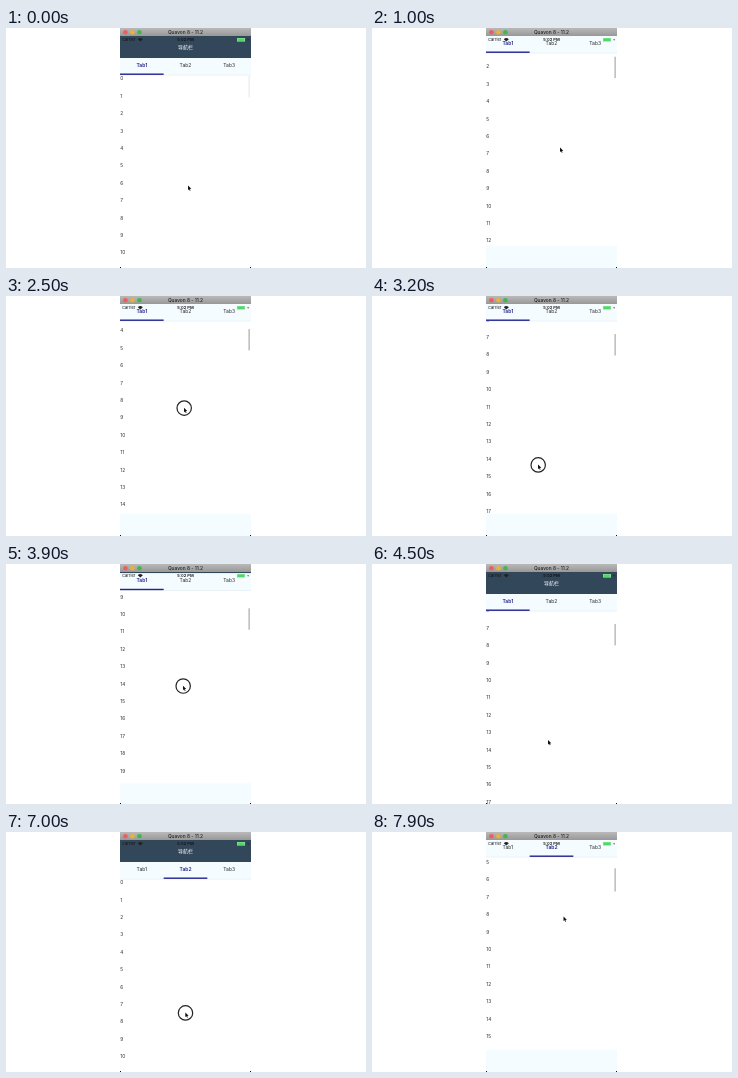
An HTML page with a canvas for the animation above (8000 ms loop, 360x240 px).

```html
<!DOCTYPE html>
<html lang="zh">
<head>
<meta charset="utf-8">
<style>
  html, body { margin: 0; width: 100%; height: 100%; overflow: hidden; background: #fff; }
  canvas { display: block; }
</style>
</head>
<body>
<canvas id="stage" width="360" height="240"></canvas>
<script>
const c = document.getElementById('stage').getContext('2d');
const LOOP = 8000, LEFT = 114, WIDTH = 131, TOP = 8, NAV = 22, TABS = 17, ROW = 17.4;
const LIST_H = 240 - TOP - NAV - TABS;
const AZURE = '#f5fcff', NAVY = '#23238f', INK = '#2a2a2a';
const SLOP = 100, FLING = 650, TRAVEL = 500;

// Each drag moves the cursor and flings the list of one page to a new scroll offset.
const drags = [
  { press: 150, release: 700, from: [182, 157.5], to: [188, 119.5], page: 0, scroll: 26, header: NAV },
  { press: 1100, release: 1700, from: [188, 119.5], to: [177.5, 172.5], page: 0, scroll: 1.3, header: 0 },
  { press: 1950, release: 2550, from: [177.5, 172.5], to: [178, 110], page: 0, scroll: 109, header: NAV },
  { press: 3100, release: 3550, from: [166, 168.5], to: [177, 120], page: 0, scroll: 158, header: NAV },
  { press: 3750, release: 4350, from: [177, 120], to: [176, 176], page: 0, scroll: 94, header: 0 },
  { press: 5750, release: 6150, from: [205, 175], to: [165, 176], header: 0 },
  { press: 6900, release: 7500, from: [179.3, 180.5], to: [191.5, 84.5], page: 1, scroll: 90.4, header: NAV }
];
drags.forEach((d, i) => {
  const next = drags[i + 1];
  d.start = d.press + SLOP;
  d.rest = Math.min(d.release + FLING, next ? next.press + SLOP : Infinity);
});
const pageRows = [100, 92];

const progress = (t, a, b) => Math.min(1, Math.max(0, (t - a) / (b - a)));
const smooth = u => u * u * (3 - 2 * u);
const easeOut = u => Math.sin(u * Math.PI / 2);
const mix = (a, b, u) => a + (b - a) * u;

const scrollAt = (page, t) => drags.filter(d => d.page === page)
  .reduce((s, d) => mix(s, d.scroll, easeOut(progress(t, d.start, d.rest))), 0);

const collapseAt = t => drags
  .reduce((h, d) => mix(h, d.header, smooth(progress(t, d.start, d.start + 350))), 0);

const swipeAt = t => WIDTH * smooth(progress(t, 5850, 6600));

// Scroll bars show while a list moves and fade soon after it rests.
const barAlpha = (page, t) => Math.max(page ? 0 : .25 * (1 - progress(t, 0, 150)),
  ...drags.filter(d => d.page === page)
    .map(d => progress(t, d.start, d.start + 150) * (1 - progress(t, d.rest + 300, d.rest + 600))));

const cursorAt = t => [0, 1].map(axis => drags.reduce((v, d, i) => {
  const free = i ? Math.max(drags[i - 1].release, d.press - TRAVEL) : -TRAVEL;
  const begin = mix(v, d.from[axis], i ? smooth(progress(t, free, d.press)) : 1);
  return mix(begin, d.to[axis], smooth(progress(t, d.start, d.release)));
}, 0));

function rect(color, x, y, w, h) {
  c.fillStyle = color;
  c.fillRect(x, y, w, h);
}

function dot(color, x, y, r) {
  c.fillStyle = color;
  c.beginPath();
  c.arc(x, y, r, 0, 7);
  c.fill();
}

function text(str, x, y, color = INK, size = 5, weight = 400, align = 'center') {
  c.font = `${weight} ${size}px Inter, "Noto Sans CJK SC", "Noto Sans CJK", sans-serif`;
  c.textAlign = align;
  c.fillStyle = color;
  c.fillText(str, x, y);
}

function clipped(x, y, w, h, draw) {
  c.save();
  c.beginPath();
  c.rect(x, y, w, h);
  c.clip();
  draw();
  c.restore();
}

function drawPage(page, x, top, t) {
  const scroll = scrollAt(page, t), ratio = LIST_H / (pageRows[page] * ROW);
  rect('#fff', x, top, WIDTH, LIST_H);
  for (let n = Math.max(0, Math.floor(scroll / ROW) - 1); n * ROW < scroll + LIST_H + ROW; n++)
    text(n, x + .3, top + 5.3 + n * ROW - scroll, INK, 4.8, 400, 'left');
  c.globalAlpha = barAlpha(page, t);
  rect('#999', x + 128.6, top + 1 + scroll * ratio, 1, LIST_H * ratio);
  c.globalAlpha = 1;
}

function drawHeader(shift, swipe, t) {
  const y = TOP - shift, tabs = y + NAV, active = t < 6400 ? 0 : 1;
  rect('#33475b', LEFT, y, WIDTH, NAV);
  text('导航栏', 179.5, y + 13.4, '#fff', 5);
  rect(AZURE, LEFT, tabs, WIDTH, TABS);
  rect('#d9e6ea', LEFT, tabs + TABS - .2, WIDTH, .5);
  for (let i = 0; i < 3; i++)
    text('Tab' + (i + 1), LEFT + WIDTH * (i + .5) / 3, tabs + 8.8,
      i === active ? NAVY : INK, 5, i === active ? 600 : 400);
  rect(NAVY, LEFT + swipe / 3, tabs + 15.5, WIDTH / 3, 1.4);
}

function drawStatus() {
  text('Carrier', 116, 13.4, '#111', 4.1, 400, 'left');
  c.fillStyle = '#222';
  c.beginPath();
  c.moveTo(134.3, 13.6);
  c.arc(134.3, 13.6, 3.4, -2.4, -.74);
  c.fill();
  text('5:02 PM', 179.5, 13.4, '#111', 4.1, 600);
  rect('#8fe09c', 231, 10, 8, 3.6);
  rect('#4cd964', 231.6, 10.6, 6.6, 2.4);
  text('+', 242, 13.3, '#111', 4);
}

function drawWindowBar() {
  const g = c.createLinearGradient(0, 0, 0, TOP);
  g.addColorStop(0, '#b9b9b9');
  g.addColorStop(1, '#989898');
  rect(g, LEFT, 0, WIDTH, TOP);
  ['#ee5f5a', '#e9b23c', '#40b84c'].forEach((color, i) => dot(color, 119.4 + 7 * i, 4.2, 2.3));
  text('Quavon 8 - 11.2', 179.5, 6, '#222', 4.8, 500);
}

function drawCursor(t) {
  const [x, y] = cursorAt(t);
  if (drags.some(d => t >= d.press && t < d.release)) {
    c.strokeStyle = '#222';
    c.lineWidth = 1.2;
    c.beginPath();
    c.arc(x + .2, y + .4, 7.2, 0, 7);
    c.stroke();
  }
  c.beginPath();
  [[0, 0], [0, 4.6], [1.1, 3.7], [1.8, 5.3], [2.6, 5], [1.9, 3.4], [3.3, 3.3]]
    .forEach(([dx, dy]) => c.lineTo(x + dx, y + dy));
  c.closePath();
  c.strokeStyle = '#fff';
  c.lineWidth = .8;
  c.stroke();
  c.fillStyle = '#111';
  c.fill();
}

function draw(t) {
  const shift = collapseAt(t), swipe = swipeAt(t), top = TOP + NAV + TABS - shift;
  rect('#fff', 0, 0, 360, 240);
  rect(AZURE, LEFT, TOP, WIDTH, 240 - TOP);
  clipped(LEFT, top, WIDTH, LIST_H, () => {
    drawPage(0, LEFT - swipe, top, t);
    drawPage(1, LEFT - swipe + WIDTH, top, t);
  });
  clipped(LEFT, TOP, WIDTH, 240 - TOP, () => drawHeader(shift, swipe, t));
  drawStatus();
  drawWindowBar();
  rect('#111', LEFT, 239, 1, 1);
  rect('#111', LEFT + WIDTH - 1, 239, 1, 1);
  drawCursor(t);
}

const start = performance.now();
function tick() {
  draw((performance.now() - start) % LOOP);
  requestAnimationFrame(tick);
}
tick();
</script>
</body>
</html>
```
